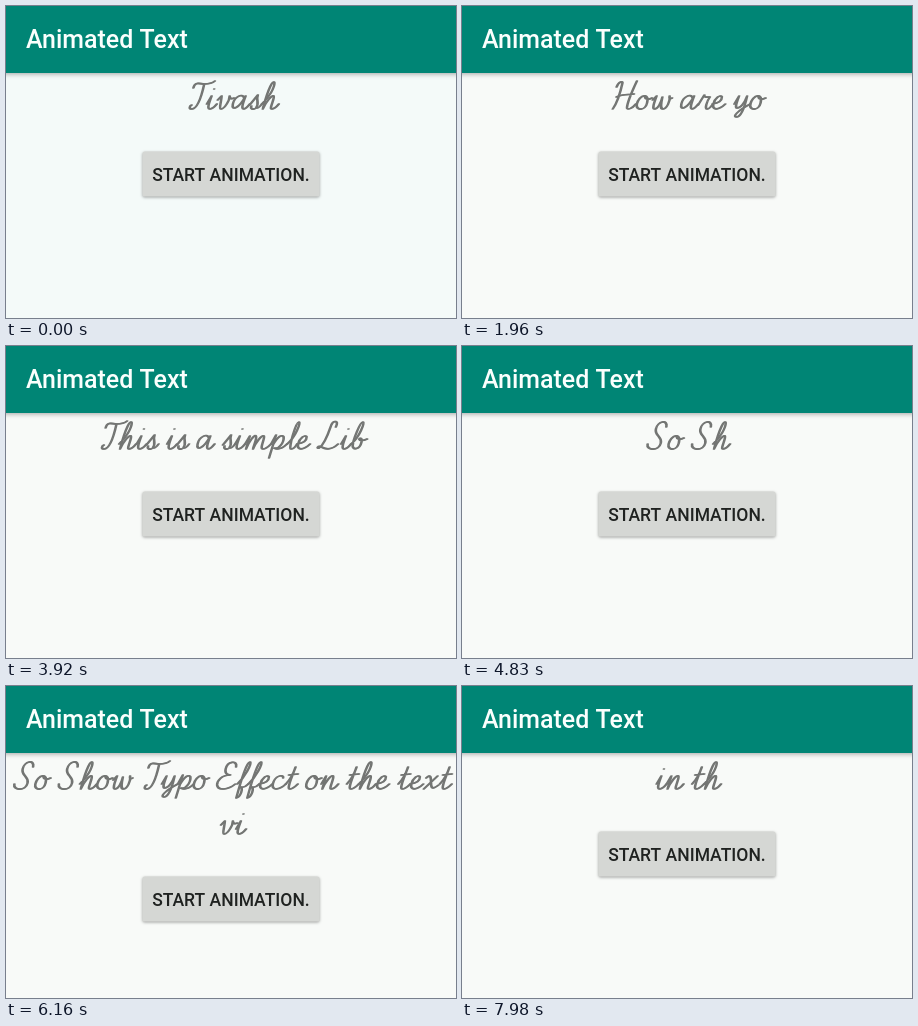
Write an HTML page with a canvas that moves like this. It is 450 by 312 pixels and loops after 8000 ms.

```html
<!DOCTYPE html>
<html lang="en">
<head>
<meta charset="utf-8">
<title>Animated Text</title>
<style>
  html, body { margin: 0; width: 100%; height: 100%; overflow: hidden; }
  canvas { display: block; }
</style>
</head>
<body>
<canvas width="450" height="312" role="img"></canvas>
<script>
const canvas = document.querySelector('canvas');
const ctx = canvas.getContext('2d');

const LOOP = 8000, STEP = 70, CHAR_MS = 70 / 1.5;
const CENTER = 226, BASELINE = 103, LINE_HEIGHT = 45, MAX_WIDTH = 441, SLANT = 0.22;

// Script lettering: advance width and upright pen path, baseline at y = 0.
const pen = (advance, path) => ({ advance, path: new Path2D(path) });
const glyphs = {
  ' ': pen(8.5, ''),
  '.': pen(5, 'M2.5-1.2a.5.5 0 1 1 .1 0'),
  a: pen(17, 'M10-11C8-16 0-13 0-5C0 2 7 0 11-13C10-7 9 0 12 0Q14 0 17-5'),
  b: pen(16, 'M0-5C7-12 9-26 7-27C4-27 1-8 2-3C3 1 10 1 10-7C10-10 8-12 7-10Q9-7 15-10'),
  c: pen(13, 'M9-11C9-15 0-14 0-5C0 2 8 1 13-5'),
  d: pen(18, 'M10-11C8-16 0-13 0-5C0 2 8-1 11-27C10-10 9 0 12 0Q15 0 18-5'),
  e: pen(13.5, 'M0-5C6-6 9-8 8-12C6-15 1-11 1-5C1 2 8 1 13-5'),
  f: pen(11, 'M0-5C6-12 10-25 8-27C5-28 3-12 2 9C6 8 7 0 4-2Q8-1 11-5'),
  g: pen(16, 'M10-11C8-16 0-13 0-5C0 2 8-2 11-13C11-3 10 8 5 8C1 8 4 2 16-5'),
  h: pen(17.5, 'M0-5C6-12 9-21 8-26C6-30 3-22 2 0C4-8 8-14 10-13C12-11 8 0 11 0Q14 0 17-5'),
  i: pen(10, 'M0-5L3-13C2-7 1 0 4 0Q7 0 10-5M4-20l.1 0'),
  l: pen(10, 'M0-5C7-12 9-26 7-27C4-27 2 0 5 0Q8 0 10-5'),
  m: pen(26, 'M0-5L3-13L2 0C3-6 7-15 9-13C11-11 9-4 9 0C10-6 15-15 17-13C19-11 15 0 19 0Q22 0 26-5'),
  n: pen(17, 'M0-5L3-13L2 0C3-6 8-15 10-13C12-11 8 0 11 0Q14 0 17-5'),
  o: pen(15, 'M7-13C2-14 0-8 0-5C0 2 10 2 10-6C10-11 8-13 6-13Q8-8 14-11'),
  p: pen(16, 'M0-5L3-14L1 9M2-4C5-13 9-15 11-12C13-6 8 1 4-1Q10 2 16-5'),
  r: pen(14, 'M0-4L4-14C4-11 8-12 10-12C8-8 7 0 10 0Q12 0 14-4'),
  s: pen(12, 'M0-4L6-14C5-9 10-5 7-1C5 1 1 0 2-3M8-1Q10-1 12-5'),
  t: pen(12, 'M0-5Q5-12 6-22C4-10 2 0 5 0Q8 0 12-5M1-14L10-15'),
  u: pen(17, 'M0-5L3-13C2-6 1 0 4 0C7 0 10-6 11-13C10-6 9 0 12 0Q14 0 16-5'),
  v: pen(16, 'M0-9L3-13C4-8 3 0 5 0C9 0 12-9 11-13Q12-9 16-11'),
  w: pen(21, 'M0-9L3-13C2-6 1 0 4 0C7 0 9-6 9-12C9-5 9 0 12 0C16 0 18-8 16-13Q16-9 19-11'),
  x: pen(16, 'M1-11C5-16 6-10 7-6C8-1 10 1 15-4M12-13L1 0'),
  y: pen(16, 'M0-5L3-13C2-6 1-1 4-1C7-1 10-6 11-13C11-3 10 8 5 8C1 8 4 2 16-5'),
  E: pen(20, 'M15-22C15-29 5-28 5-20C5-15 9-14 11-14C2-14-1-8 0-4C2 2 12 1 18-5'),
  H: pen(24, 'M0-22C1-28 5-28 5-26C5-16 4-6 1 0M19-28C17-20 14-6 15-1C16 1 20 0 23-5M2-12C8-15 14-14 19-15'),
  L: pen(22, 'M13-22C15-29 9-29 8-24C7-16 6-5 1-1C-2 0-1-4 3-2C9 1 14 1 19-5'),
  S: pen(21, 'M15-22C15-30 5-28 5-20C5-13 13-13 13-6C13 2 0 2 0-5'),
  T: pen(20, 'M3-21C3-28 8-25 13-25C18-25 21-26 23-28M13-25C13-12 12 0 6 0C3 0 3-3 5-4'),
  W: pen(35, 'M1-23C3-29 7-28 7-22C6-10 3 0 7 0C12 0 17-15 19-27C17-10 14 0 19 0C26 0 31-15 29-27'),
};

// Each phrase is typed from its start time at a constant rate.
const phrases = [
  [-1000, 'Tivash'],
  [1000, 'Hi Tivash'],
  [1510, 'How are you.What are you doing.'],
  [3015, 'This is a simple Library'],
  [4600, 'So Show Typo Effect on the text view'],
  [6680, 'So you can use this lib'],
  [7770, 'in the'],
];

function typedText(t) {
  const [start, text] = phrases.findLast(([from]) => t >= from);
  return text.slice(0, 1 + Math.floor((t - start) / CHAR_MS)).trimEnd();
}

const widthOf = text => [...text].reduce((sum, c) => sum + glyphs[c].advance, 0);

function wrap(text) {
  const lines = [''];
  for (const word of text.split(' ')) {
    const line = lines.at(-1);
    const longer = line ? line + ' ' + word : word;
    if (widthOf(longer) <= MAX_WIDTH) lines[lines.length - 1] = longer;
    else lines.push(word);
  }
  return lines;
}

function drawScript(text, baseline) {
  let x = CENTER - widthOf(text) / 2;
  ctx.strokeStyle = '#737573';
  ctx.lineWidth = 1.6;
  ctx.lineCap = ctx.lineJoin = 'round';
  for (const c of text) {
    // Two shifted passes make upright strokes heavier than level ones.
    for (const nib of [-0.5, 0.5]) {
      ctx.setTransform(1, 0, -SLANT, 1, x + nib, baseline);
      ctx.stroke(glyphs[c].path);
    }
    x += glyphs[c].advance;
  }
  ctx.resetTransform();
}

function shadowed(color, blur, offset, shadow, shape) {
  ctx.save();
  ctx.fillStyle = color;
  ctx.shadowColor = shadow;
  ctx.shadowBlur = blur;
  ctx.shadowOffsetY = offset;
  ctx.beginPath();
  shape();
  ctx.fill();
  ctx.restore();
}

function label(text, size, color, align, x, y) {
  ctx.font = `500 ${size}px Roboto, sans-serif`;
  ctx.fillStyle = color;
  ctx.textAlign = align;
  ctx.fillText(text, x, y);
}

function draw(now) {
  const t = Math.floor((now % LOOP) / STEP) * STEP;
  const text = typedText(t);
  const lines = wrap(text);
  const drop = (lines.length - 1) * LINE_HEIGHT;
  const pressed = t >= 490 && t < 900;

  ctx.fillStyle = t < 490 ? '#f4faf9' : '#f8faf8';
  ctx.fillRect(0, 0, 450, 312);
  shadowed('#008575', 5, 1, 'rgba(0,0,0,.35)', () => ctx.rect(-10, -10, 470, 77));
  label('Animated Text', 24.95, '#fafffd', 'left', 20, 42);

  lines.forEach((line, i) => drawScript(line, BASELINE + i * LINE_HEIGHT));
  canvas.setAttribute('aria-label', text);

  shadowed(pressed ? '#cfd2d0' : '#d5d7d4', pressed ? 6 : 3, pressed ? 2 : 1, 'rgba(0,0,0,.35)',
    () => ctx.roundRect(136.5, 145.5 + drop, 177, 45, 2));
  label('START ANIMATION.', 17.5, '#1f2220', 'center', 225, 175 + drop);

  requestAnimationFrame(() => draw(performance.now() - origin));
}

const origin = performance.now();
draw(0);
</script>
</body>
</html>
```
